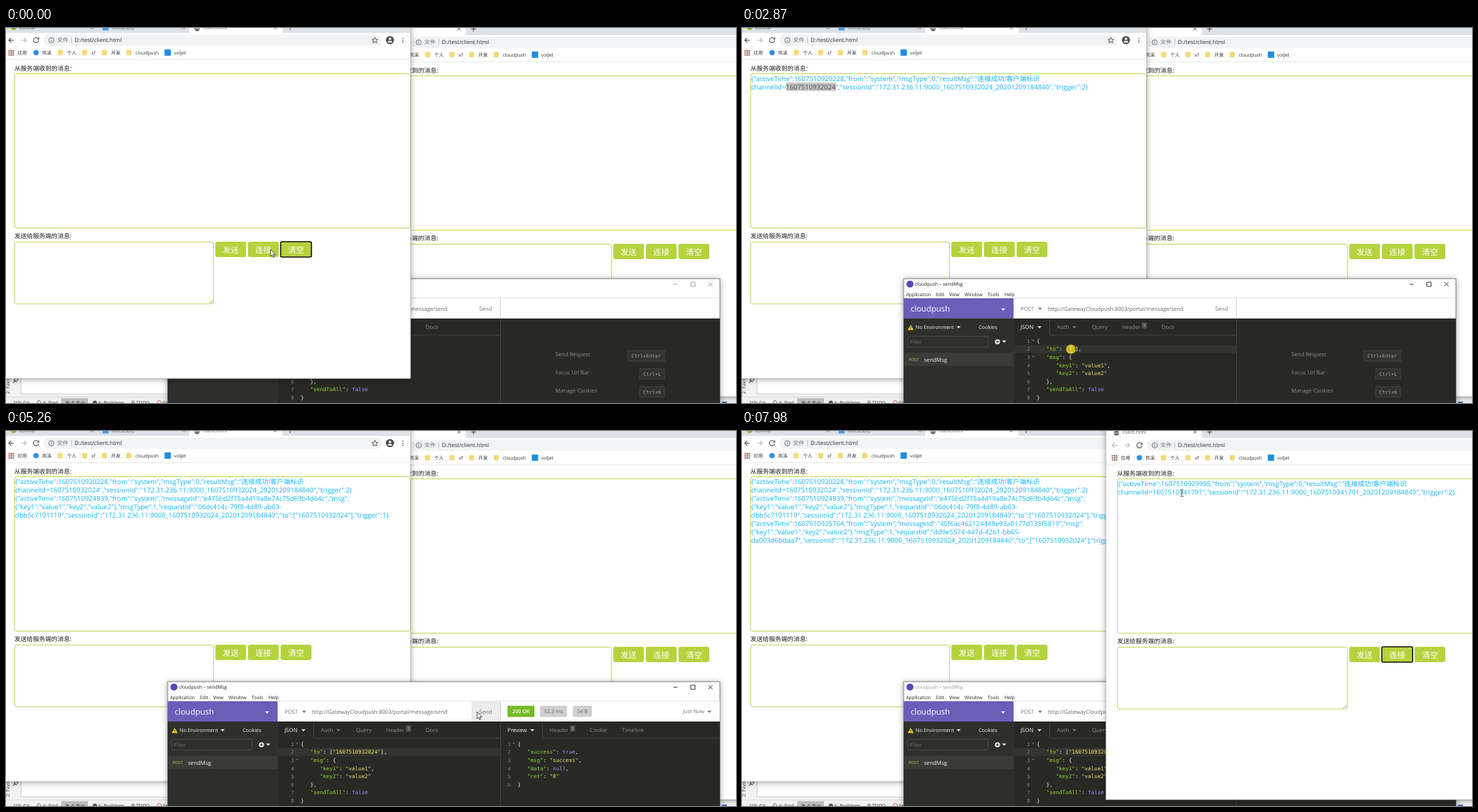
Write an HTML page that moves like this. It is 1043 px wide and 537 px high and loops after 8000 ms.

```html
<!DOCTYPE html>
<html lang="zh-CN">
<head>
<meta charset="utf-8">
<title>Push demo</title>
<style>
html, body { margin: 0; width: 100%; height: 100%; overflow: hidden; background: #f2f2f2; }
svg { position: absolute; left: 0; top: 0; width: 1043px; height: 537px; overflow: hidden; }
text { font-family: 'Open Sans', 'Noto Sans CJK SC', 'Noto Sans CJK JP', 'Noto Sans CJK', sans-serif; text-rendering: geometricPrecision; }
.mono { font-family: 'DejaVu Sans Mono', monospace; }
.mid { text-anchor: middle; }
.end { text-anchor: end; }
.b { font-weight: 600; }
.shadow { filter: drop-shadow(0 1px 4px rgba(0, 0, 0, .35)); }
.line { fill: none; stroke-width: 1; }
</style>
</head>
<body>
<svg id="ide"></svg>
<svg id="right"></svg>
<svg id="client"></svg>
<svg id="left"></svg>
<svg id="pointer"></svg>
<script>
const LOOP = 8000, GREEN = '#b5d33d', EDGE = '#bdd75c', BLUE = '#10b6fa', GREY = '#8e8e8b';
const $ = id => document.getElementById(id);
const text = (x, y, s, size, fill, cls = '') =>
  `<text x="${x}" y="${y}" font-size="${size}" fill="${fill}" class="${cls}">${s}</text>`;
const rect = (x, y, w, h, fill, more = '') =>
  `<rect x="${x}" y="${y}" width="${w}" height="${h}" fill="${fill}" ${more}/>`;
const frame = (x, y, w, h, stroke, r = 0) => rect(x, y, w, h, 'none', `stroke="${stroke}" rx="${r}"`);
const disc = (x, y, r, fill, more = '') => `<circle cx="${x}" cy="${y}" r="${r}" fill="${fill}" ${more}/>`;
const line = (d, stroke, w = 1) => `<path d="${d}" class="line" stroke="${stroke}" style="stroke-width:${w}"/>`;
const caret = (x, y, fill) => `<path d="M${x - 3} ${y - 1.5}h6l-3 3.2z" fill="${fill}"/>`;
const cross = (x, y, r, c) => line(`M${x - r} ${y - r}l${2 * r} ${2 * r}m0 ${-2 * r}l${-2 * r} ${2 * r}`, c, .9);
const group = (id, s, more = '') => `<g id="${id}" ${more}>${s}</g>`;
const shift = (x, y, s) => `<g transform="translate(${x} ${y})">${s}</g>`;

// ---- chat log lines
const session = (id, end) => `"sessionId":"172.31.236.11:9000_${id}_${end}"`;
const hello = (time, id, end) => [
  `{"activeTime":${time},"from":"system","msgType":0,"resultMsg":"连接成功!客户端标识`,
  `channelId=${id}",${session(id, end)},"trigger":2}`];
const push = (time, msg, req1, req2) => [
  `{"activeTime":${time},"from":"system","messageId":"${msg}","msg":`,
  `{"key1":"value1","key2":"value2"},"msgType":1,"requestId":"${req1}-`,
  `${req2}",${session(ID, '20201209184840')},"to":["${ID}"],"trigger":1}`];
const ID = '1607510932024';
const log = (id, row, lines) =>
  group(id, lines.map((s, i) => text(13, 76 + (row + i) * 12.07, s, 9.6, BLUE)).join(''));
const selection = (id, back, fore) =>
  group(id, rect(62.7, 78, 71.6, 12.2, back) + text(62.5, 88.07, ID, 9.6, fore));

// ---- browser windows
const tab = (x, y = 2) => disc(x + 11, y - 1, 3.6, '#5f6368') + line(`M${x + 8} ${y - 1}h6`, '#fff', .8) +
  text(x + 20, y + .3, 'client.html', 6.8, '#5f6368') + cross(x + 123, y - 2.5, 2, '#444') +
  line(`M${x + 140.5} ${y - 2.5}h7m-3.5 -3.5v7`, '#444', 1);
const folder = (x, s) => rect(x - 11, 31.5, 7, 7.5, '#f8d775', 'rx="1"') + text(x + 2, 38, s, 6.8, '#333');

function toolbar(back) {
  const arrow = (x, d, c) => line(`M${x - 3.5 * d} 17.5h${7 * d}m${-3.3 * d} -3.3l${3.3 * d} 3.3l${-3.3 * d} 3.3`, c, 1.1);
  let s = rect(54, 9.5, 483, 16, '#f1f3f4', 'rx="8"') + arrow(7.5, -1, back) + arrow(25.5, 1, '#b8babd') +
    line('M46 15.2a3.7 3.7 0 1 0 .6 3.2m.2 -4.8v2.6h-2.6', '#4a4d51', 1.1) +
    line('M61.2 17.5a3.7 3.7 0 1 0 7.4 0a3.7 3.7 0 1 0 -7.4 0M64.9 17v2.3m0 -4v.8', '#5f6368', .9) +
    text(73, 20.3, '文件', 8, '#6a6d71') + line('M93.5 13v9', '#b5b7ba', .8) +
    text(98, 20.3, 'D:/test/client.html', 8, '#26282b') +
    '<path d="M527 13.4l1.2 2.8 3 .3-2.3 2 .7 3-2.6-1.6-2.6 1.6 .7-3-2.3-2 3-.3z" class="line" stroke="#55585c"/>' +
    disc(548.6, 17.3, 5.8, '#484b50') + disc(548.6, 15.6, 1.8, '#fff') + rect(545.5, 18.4, 6.2, 2.4, '#fff', 'rx="1.2"');
  for (let i = 0; i < 3; i++) s += disc(567, 14.6 + i * 2.9, .8, '#4a4d51');
  for (let i = 0; i < 9; i++)
    s += rect(3.5 + i % 3 * 3, 31.5 + (i / 3 | 0) * 3, 2, 2, ['#d0543c', '#4a4a4a', '#7c5b45'][i % 3]);
  return s + text(16.5, 38, '应用', 6.8, '#333') + disc(43, 35.3, 3.8, '#2f8fe8') + text(51.5, 38, '岚溪', 6.8, '#333') +
    folder(85, '个人') + folder(120, 'xf') + folder(148, '开发') + folder(183, 'cloudpush') +
    rect(226.5, 30.7, 9, 9, '#1c8cdb') + text(240, 38, 'voljet', 6.8, '#333') + rect(-5, 45, 600, .8, '#e3e5e8');
}

function page(inputW) {
  const x0 = inputW + 14.5;
  const button = (s, i) => rect(x0 + i * 46.7, 306, 44, 22, GREEN, 'rx="3"') +
    text(x0 + 22 + i * 46.7, 321.5, s, 11.5, '#fff', 'mid');
  return text(12, 60.6, '从服务端收到的消息:', 8.8, '#1c1c1c') + frame(12.5, 65.5, 565, 221, EDGE, 2.5) +
    text(12, 301.2, '发送给服务端的消息:', 8.8, '#1c1c1c') + frame(12.5, 306.5, inputW - .5, 88.5, EDGE, 2.5) +
    line(`M${inputW + 6} 394l5 -5m-2.2 5l2.2 -2.2`, '#888', .7) + ['发送', '连接', '清空'].map(button).join('');
}
const focus = (id, x) => group(id, frame(x, 306, 44, 22, '#101010', 2), 'stroke-width="1.6"');

$('left').innerHTML = rect(-10, -10, 588, 512, '#fff', 'class="shadow" stroke="#a6a6a6" stroke-width=".7"') +
  rect(0, 0, 577.6, 7, '#dee1e6') + rect(262, 0, 133, 8, '#fff') +
  disc(11, -1, 4, '#7ab83c') + text(19, 2.3, 'eureka', 6.8, '#5f6368') + cross(123, -.5, 2, '#555') +
  rect(138, -5, 8.5, 8.5, '#3c9cf0') + text(151, 2.3, '林间云笔记', 6.6, '#5f6368') + cross(254, -.5, 2, '#555') +
  tab(262) + toolbar('#4a4d51') + page(284.5) + focus('focusClear', 392.4) + focus('focusConnect', 345.7) +
  log('msg1', 0, hello('1607510920228', ID, '20201209184840')) +
  selection('selActive', '#3390ff', '#fff') + selection('selIdle', '#c8c8c8', '#3c3c3c') +
  log('msg2', 2, push('1607510924939', 'e475bd2f75a4419a8e74c75d69b4d64c', '06dc414c-79f8-4d89-ab03', 'dbb5c7191119')) +
  log('msg3', 5, push('1607510925764', '40f6ac462124448e93a0177d135f5819', 'dd9e5574-447d-42b1-bb65', 'da003d6bdaa7'));

$('right').innerHTML = shift(524, 3,
  rect(-4, -20, 560, 545, '#fff', 'class="shadow" stroke="#a6a6a6" stroke-width=".7"') +
  rect(133, -3, 400, 10, '#dee1e6') + tab(0, 1) + shift(.8, 0, toolbar('#b8babd')) + page(329) +
  focus('focusRight', 390.2) + log('msg4', 0, hello('1607510929995', '1607510941791', '20201209184849')));

// ---- IDE behind everything
$('ide').innerHTML = rect(0, 0, 1043, 537, '#f2f2f2') + rect(21.5, 495, 1010, 29, '#fff', 'stroke="#cfcfcf"') +
  rect(0, 528, 1043, .8, '#d4d4d4') + rect(79, 530, 38, 8, '#bdbdbd') +
  `<g transform="rotate(-90 5 524)">${text(5, 524, '2: Favorites', 6.8, '#333')}</g>` +
  line('M10 508l3 -3m-2 -2l4 4m-2 -4l2 -1.5l2 2l-1.6 2', '#555', 1.1) +
  [[17, '9: Git'], [53, '6: Find'], [93, '4: Run'], [132, '6: Problems'], [186, 'TODO'], [224, 'Services']]
    .map(([x, s]) => text(x, 539.2, s, 6.8, '#2a2a2a')).join('') +
  line('M12 534v4m3 -4v4', '#666') + disc(47, 536, 2.3, 'none', 'stroke="#666"') +
  '<path d="M86 533.5l5 3-5 3z" fill="#666"/>' + disc(127, 536.5, 3, '#555') +
  line('M179 534.5h5m-5 2h5', '#666') + disc(219, 536.5, 3, 'none', 'stroke="#d2552d"') + rect(1023, 535, 7, 3, '#3b6fc4');

// ---- API client
const ROW = 11.57, CH = 4.575;
const tint = s => s.replace(/("[^"]*")(:?)|true|false|null/g, (m, str, colon) => str
  ? `<tspan fill="${colon ? '#8fd43a' : '#ece36c'}">${str}</tspan>${colon}`
  : `<tspan fill="#ab8cf2">${m}</tspan>`);
const code = (x, row, s) => {
  const pad = s.search(/\S/);
  return text(x + pad * CH, 450.8 + row * ROW, tint(s.trim()), 7.6, '#f4f4ee', 'mono');
};
const gutter = (x, n, folds) => Array.from({ length: n }, (_, i) =>
  text(x, 450.8 + i * ROW, i + 1, 7, '#85867f', 'mono end')).join('') +
  folds.map(i => caret(x + 5.5, 447.8 + i * ROW, '#6c6d67').replace('h6l-3 3.2', 'h4l-2 2.4')).join('');
const badge = (x, s) => rect(x - 3.5, 421.5, 7, 9, '#55564f', 'rx="1"') + text(x, 428.3, s, 5.8, '#ccc', 'mid');
const hint = (y, s, key, x) => text(785, y + 2.8, s, 7.8, GREY) +
  rect(x, y - 5.5, 941 - x, 15, '#32332f', 'stroke="#454641" stroke-width=".8"') +
  text((x + 941) / 2, y + 4.7, key, 7, '#a0a09c', 'mono mid');
const chip = (x, w, s, back, fore, cls = '') => rect(x, 393.5, w, 16, back) + text(x + w / 2, 404.4, s, 7.4, fore, 'mid ' + cls);

const request = ['{', , '   "msg": {', '      "key1": "value1",', '      "key2": "value2"', '   },', '   "sendToAll": false', '}'];
const reply = ['{', '   "success": true,', '   "msg": "success",', '   "data": null,', '   "ret": "0"', '}'];

const response = chip(716.5, 38.5, '200 OK', '#75ba24', '#fff', 'b') + chip(810, 27, '54 B', '#cfcfcf', '#666') +
  text(967, 404.4, 'Just Now', 7.6, '#777') + caret(1005, 402, '#777') +
  line('M766.5 416v24H1020', '#45463f', .9) + text(716.5, 431.2, 'Preview', 7.7, '#fff') + caret(752, 428.5, '#ddd') +
  text(777, 431.2, 'Header', 7.8, GREY) + badge(809.5, 3) + text(834, 431.2, 'Cookie', 7.8, GREY) +
  text(880, 431.2, 'Timeline', 7.8, GREY) + gutter(721, 6, [0]) + reply.map((s, i) => code(731, i, s)).join('');

const arrowHalf = line('M-10 -3A10.5 10.5 0 0 1 7.5 -7.3', '#dededc', 4) + '<path d="M12.5 -13v10.5h-10.5z" fill="#dededc"/>';
const loading = rect(706, 386.4, 313.6, 152, '#1a1a18', 'fill-opacity=".78"') + text(862.5, 455, 'Loading...', 12.3, '#ececea', 'mid') +
  shift(863, 490, group('spin', `${arrowHalf}<g transform="rotate(180)">${arrowHalf}</g>`)) +
  frame(825, 526.5, 75.5, 20, '#8a8a86', 1.5) + text(862.7, 539, 'Cancel Request', 7.7, '#e6e6e4', 'mid');

$('client').innerHTML = rect(231, 359, 789, 200, '#fff', 'class="shadow" stroke="#777" stroke-width=".9"') +
  disc(240, 366.8, 5, '#5a45b5') + text(247, 369.4, 'cloudpush – sendMsg', 6.8, 'currentColor') +
  line('M953.5 367h6M978.5 364h6v6h-6z', 'currentColor', .9) + cross(1006.5, 367, 3, 'currentColor') +
  [[234.5, 'Application'], [277, 'Edit'], [296, 'View'], [318, 'Window'], [351, 'Tools'], [375, 'Help']]
    .map(([x, s]) => text(x, 383.6, s, 6.8, '#222')).join('') +
  rect(388, 386.4, 632, .8, '#d8d8d8') + rect(231, 387, 157, 29, '#695eb8') +
  text(241, 406, 'cloudpush', 11.5, '#fff') + caret(373, 403, '#fff') +
  group('hover', rect(665, 387, 41, 29, '#ececec')) +
  text(398, 404.6, 'POST', 7.7, '#777') + caret(426, 402, '#777') +
  text(437, 404.6, 'http://GatewayCloudpush:8003/portal/message/send', 7.82, '#666') + text(676, 404.6, 'Send', 7.9, '#777') +
  rect(231, 416, 157, 122, '#2e2f2b') + rect(388, 416, 632, 122, '#282925') +
  rect(706, 387, .9, 29, '#ccc') + rect(706, 416, .9, 122, '#45463f') + rect(387.6, 416, .8, 122, '#3b3c37') +
  '<path d="M241 425l4.2 7.5h-8.4z" fill="#f0cf2c"/>' + line('M241 427.5v2.4m0 .7v.9', '#333', .9) +
  text(248, 431.2, 'No Environment', 7.2, '#f2f2f0') + caret(309.5, 428.5, '#ddd') + text(338, 431.2, 'Cookies', 7.3, '#f2f2f0') +
  frame(236.5, 441.5, 115, 15.5, '#484944', 1) + text(240, 451.7, 'Filter', 7, '#6d6e69') +
  disc(365, 449.3, 3.6, '#eee') + line('M363 449.3h4m-2 -2v4', '#2e2f2b') + caret(374.5, 449, '#eee') +
  rect(231, 465, 156.6, 19, '#3a3b37') + text(238, 477.2, 'POST', 5.9, '#7fb84a', 'b') + text(260, 477.7, 'sendMsg', 7.9, '#f2f2f0') +
  line('M439.5 416v24H706', '#45463f', .9) + text(398, 431.2, 'JSON', 7.8, '#fff') + caret(425, 428.5, '#ddd') +
  text(450, 431.2, 'Auth', 7.8, GREY) + caret(475, 428.5, '#777') + text(500, 431.2, 'Query', 7.8, GREY) +
  text(543, 431.2, 'Header', 7.6, GREY) + badge(575, 1) + text(599.5, 431.2, 'Docs', 7.9, GREY) +
  group('activeRow', rect(388.4, 454, 317.6, 11.6, '#33342f')) + gutter(411.5, 8, [0, 2]) +
  request.map((s, i) => code(421, i, s)).join('') +
  group('toEmpty', code(421, 1, '   "to": [""],')) + group('toFull', code(421, 1, `   "to": ["${ID}"],`)) +
  group('caret', rect(530.3, 454.3, 1, 11.4, '#f8f8f0')) +
  group('hints', hint(467.5, 'Send Request', 'Ctrl+Enter', 888.5) + hint(493.2, 'Focus Url Bar', 'Ctrl+L', 905.5) +
    hint(519, 'Manage Cookies', 'Ctrl+K', 905.5)) +
  group('reply', rect(707, 387, 312.6, 29, '#fff') + response) +
  group('time1', chip(763, 38.5, '52.3 ms', '#cfcfcf', '#666')) + group('time2', chip(763, 38.5, '46.4 ms', '#cfcfcf', '#666')) +
  group('loading', loading);

$('pointer').innerHTML = group('mouse', group('click', disc(0, 0, 6.8, '#ffe800', 'fill-opacity=".72"')) +
  group('arrow', '<path d="M0 0V10L2.3 8 3.8 11.3 5.4 10.6 4 7.4H7Z" fill="#fff" stroke="#222" stroke-width=".8"/>') +
  group('beam', line('M-2.3 -4.7h1.8l.5 .5l.5 -.5h1.8M0 -4.3v8.6M-2.3 4.7h1.8l.5 -.5l.5 .5h1.8', 'currentColor', .8)));

// ---- timeline: visible spans in ms
const spans = {
  focusClear: [[0, 150]], focusConnect: [[150, 1445]], focusRight: [[7000, LOOP]],
  msg1: [[220, LOOP]], msg2: [[4660, LOOP]], msg3: [[5480, LOOP]], msg4: [[7030, LOOP]],
  selActive: [[1540, 2080]], selIdle: [[2080, 4660]], activeRow: [[2080, LOOP]],
  toEmpty: [[0, 3250]], toFull: [[3250, LOOP]], hover: [[4100, 5740]],
  hints: [[0, 4815]], reply: [[4815, LOOP]], time1: [[4815, 5550]], time2: [[5550, LOOP]],
  loading: [[4560, 4815], [5430, 5550]],
  click: [[70, 220], [1445, 1600], [2040, 2130], [2860, 2960], [4480, 4580], [5330, 5430], [6690, 6800], [6980, 7060]]
};
// time, x, y, shape until the next stop: 0 arrow, 1 dark beam, 2 light beam
const path = [
  [0, 378, 317, 0], [220, 378, 317, 0], [480, 290, 215, 1], [830, 151, 108, 1], [960, 151, 108, 1], [1220, 105.5, 89.3, 1],
  [1620, 105.5, 89.3, 1], [2000, 520, 515, 2], [2090, 520, 515, 2], [2220, 503, 449, 2], [2280, 501, 452, 2],
  [2440, 428, 455, 2], [2640, 470, 460, 2], [3330, 470, 460, 2], [3640, 646, 427, 0], [3700, 646, 427, 0],
  [3930, 670, 403, 0], [4110, 673, 402, 0], [5640, 673, 402, 0], [5880, 608, 453, 2], [6100, 518, 446, 2],
  [6240, 518, 446, 2], [6360, 570, 400, 0], [6660, 704.5, 264, 0], [6780, 704.5, 264, 0], [6950, 934, 319, 0],
  [7030, 934, 319, 0], [7090, 908, 303, 0], [7200, 850, 262, 1], [7920, 628.5, 89, 1], [LOOP, 628.5, 89, 1]];

const show = (id, on) => $(id).style.display = on ? '' : 'none';

function draw(t) {
  for (const id in spans) show(id, spans[id].some(([a, b]) => t >= a && t < b));
  show('caret', t >= 3250 && Math.floor((t - 4430) / 530) % 2 === 0);

  const clientUp = t >= 2080, rightUp = t >= 6700;
  $('left').style.zIndex = 3;
  $('client').style.zIndex = clientUp ? 4 : 2;
  $('right').style.zIndex = rightUp ? 5 : 1;
  $('pointer').style.zIndex = 9;
  $('client').style.color = clientUp && !rightUp ? '#222' : '#999';
  $('spin').setAttribute('transform', `rotate(${90 + (t - 4740) * .18})`);

  const i = path.findIndex((p, k) => t < path[k + 1][0]);
  const [t0, x0, y0, shape] = path[i], [t1, x1, y1] = path[i + 1];
  const u = (t - t0) / (t1 - t0), e = u * u * (3 - 2 * u);
  $('mouse').setAttribute('transform', `translate(${x0 + (x1 - x0) * e} ${y0 + (y1 - y0) * e})`);
  show('arrow', shape === 0);
  show('beam', shape > 0);
  $('beam').style.color = shape === 2 ? '#e8e8d8' : '#333';
}

const start = performance.now();
function tick() {
  draw((performance.now() - start) % LOOP);
  requestAnimationFrame(tick);
}
tick();
</script>
</body>
</html>
```
